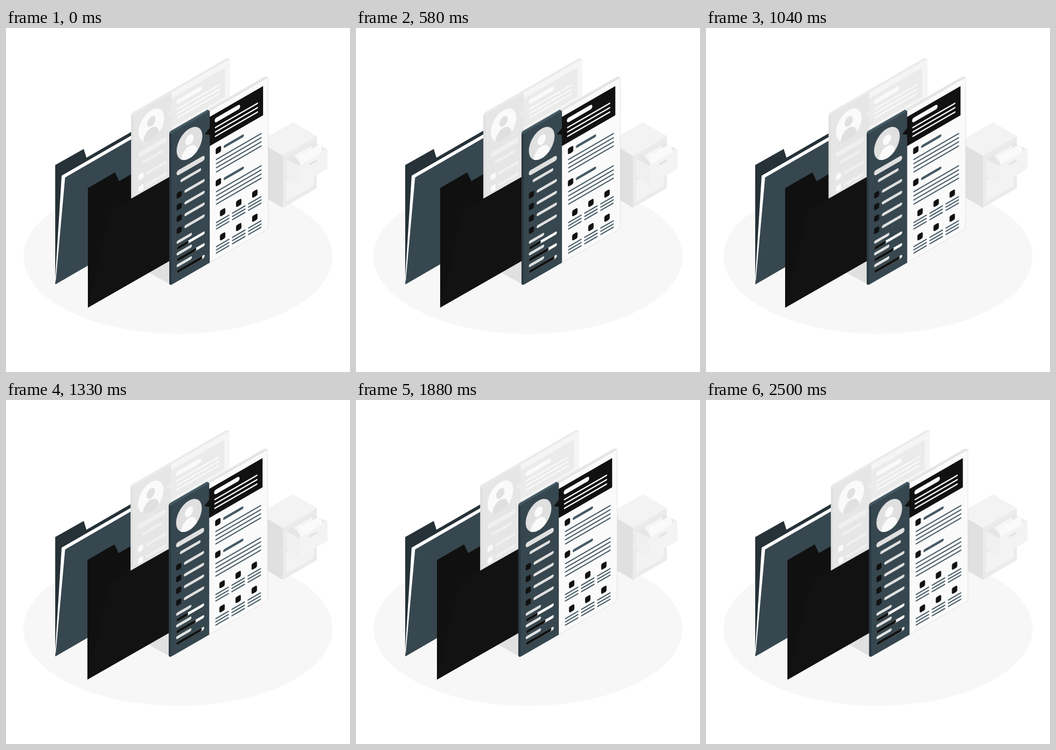
These frames come from a looping animation (748x748 px, 2.54 s). An HTML page:

```html
<!DOCTYPE html>
<html lang="en">
<head>
<meta charset="utf-8">
<title>Resume folders</title>
<style>
  html, body { margin: 0; width: 100%; height: 100%; overflow: hidden; background: #fff; }
  svg { display: block; width: 100vw; height: 100vh; }
  .dark {
    --top: #455a64; --side: #2c3a42; --panel: #37474f; --paper: #fafafa; --edge: #e6e6e6;
    --rim: #c4c4c4; --head: #111; --text: #fafafa; --disc: #e0e0e0; --person: #fafafa;
    --bar: #e0e0e0; --box: #111; --ink: #455a64; --level: #111; --rest: #fafafa;
  }
  .pale {
    --top: #ebebeb; --side: #e0e0e0; --panel: #e6e6e6; --paper: #f5f5f5; --edge: #ebebeb;
    --rim: #f5f5f5; --head: #ebebeb; --text: #fafafa; --disc: #fafafa; --person: #e0e0e0;
    --bar: #f0f0f0; --box: #fafafa; --ink: #e0e0e0; --level: #e0e0e0; --rest: #fafafa;
  }
</style>
</head>
<body>
<svg viewBox="0 0 748 748">
  <defs><clipPath id="disc"><circle cx="50.8" cy="276.4" r="32.3"/></clipPath></defs>

  <ellipse cx="374" cy="497" rx="336" ry="168" fill="#f7f7f7"/>

  <g id="cabinet">
    <path fill="#f3f3f3" d="M624 205L676 235L602 278L550 247Z"/>
    <path fill="#e0e0e0" d="M550 247L602 278V391L550 360Z"/>
    <path fill="#ebebeb" d="M602 278L676 235V348L602 391Z"/>
    <path fill="#f3f3f3" d="M609 333L669 299V343L609 377Z"/>
    <path fill="#e4e4e4" d="M609 285L669 250V292L609 327Z"/>
    <path fill="#f0f0f0" d="M609 285L638 300V341L609 324Z"/>
    <path fill="#e6e6e6" d="M609 285L669 250L699 264L638 300Z"/>
    <path fill="#f5f5f5" d="M626 277L666 254V266L638 292Z"/>
    <path fill="#fafafa" d="M636 276L646 273L683 252L687 262V272L640 298Z"/>
    <path fill="#f3f3f3" d="M638 299L687 271L690 262L699 265V306L638 341Z"/>
    <path stroke="#e2e2e2" stroke-width="4" stroke-linecap="round" d="M661 296L674 289"/>
  </g>

  <g id="folder">
    <path fill="#263238" d="M107 298L169 263L175 282L300 210V446L107 557Z"/>
    <path fill="#fff" d="M121 321L300 218V300L108 557L107 545Z"/>
    <path fill="#37474f" d="M128.500 325L300 226V446L107.500 557.500Z"/>
  </g>

  <g id="shaky">
    <path fill="#e0e0e0" d="M300 526L360 559V480H300Z"/>
    <path fill="#101010" d="M178 348L237 314L246 333L400 244V481L178 608Z"/>
    <g class="pale" transform="translate(-83 -40)"></g>
    <path fill="#121212" d="M228 396L400 298.500V481L178 608Z"/>
    <g class="dark"></g>
  </g>
</svg>
<script>
const fill = name => `style="fill:var(--${name})"`;
const shape = (name, d) => `<path ${fill(name)} d="${d}"/>`;
const box = (x, y, s = 13.5) =>
  `<rect x="${x - s / 2}" y="${y - s / 2}" width="${s}" height="${s}" rx="3.500" ${fill('box')}/>`;
const bar = (name, x1, x2, y, h) =>
  `<rect x="${x1}" y="${y - h / 2}" width="${x2 - x1}" height="${h}" rx="${h / 2}" ${fill(name)}/>`;
const circle = (name, cy, r, extra = '') =>
  `<circle cx="50.8" cy="${cy}" r="${r}" ${fill(name)} ${extra}/>`;
const each = (list, make) => list.map(make).join('');

function resume() {
  const slab =
    shape('edge', 'M95 225.500H238Q242 225.500 248.300 231.400V250H95Z') +
    `<path style="fill:var(--paper);stroke:var(--rim)" stroke-width=".5"
      d="M101.600 231.400H244Q248.300 231.400 248.300 236V556Q248.300 561 244 561H101.600Z"/>` +
    shape('top', 'M0 230Q0 225.500 4 225.500H95.800L101.600 231.400V561H8Q0 561 0 554Z') +
    shape('side', 'M0 229L5.800 234V561Q0 559 0 554Z') +
    shape('panel', 'M5.800 235Q5.800 231.400 9 231.400H101.600V561H5.800Z');

  const profile =
    circle('disc', 276.4, 32.3) + circle('person', 268.4, 10.4) +
    circle('person', 302, 19.8, 'clip-path="url(#disc)"') +
    bar('bar', 18.5, 89, 326, 11) + bar('bar', 28, 80, 347, 6.5);

  const contacts = each([375, 400.5, 426, 452], y =>
    box(25, y, 12.8) + bar('bar', 38, 89, y, 6.5));

  const skills = each([48.5, 68, 83], (end, i) => {
    const y = 476 + i * 25.5;
    return bar('bar', 18.5, 57, y, 6.5) +
      bar('rest', 19, 89, y + 13, 6.5) + bar('level', 19, end, y + 13, 6.5);
  });

  const header =
    shape('head', 'M101.600 244H235.600V307.500H101.600V283L89 275.500L101.600 268Z') +
    bar('text', 114, 178, 259, 10) +
    each([274.5, 284, 293.5], y => bar('text', 114.5, 223, y, 3.2));

  const sections = each([327, 397], y =>
    box(123.3, y) + bar('ink', 136.5, 187.5, y, 6) +
    each([18, 27, 36, 45], d => bar('ink', 117, 232, y + d, 2.8)));

  const grid = each([467.5, 520], y => each([134, 174.4, 214.8], x =>
    box(x, y) + each([14.5, 21.5, 28.5], d => bar('ink', x - 17, x + 17, y + d, 2.8))));

  return `<g transform="matrix(.866 -.5 0 1 355 0)">
    ${slab + profile + contacts + skills + header + sections + grid}</g>`;
}
document.querySelectorAll('.pale, .dark').forEach(g => { g.innerHTML = resume(); });

// Shake: [ms, x offset], straight lines between, shown at 24 pictures a second
const LOOP = 2540;
const shake = [
  [0, 0], [145, -1.5], [295, 3], [445, -6], [595, 6], [768, -6], [895, 6], [1045, -6],
  [1195, 3], [1340, -1.5], [1495, 0], [1645, -1.5], [1795, 3], [1945, -6],
  [2095, 6], [2245, -6], [2418, 6], [2568, -6]
];
function offsetAt(t) {
  const i = shake.findIndex(([ms]) => ms > t);
  const [t0, x0] = shake[i - 1], [t1, x1] = shake[i];
  return x0 + (x1 - x0) * (t - t0) / (t1 - t0);
}
const frames = Array.from({ length: 61 }, (_, k) => {
  const t = Math.round(k * 100 / 24) * 10;
  return { offset: t / LOOP, transform: `translateX(${offsetAt(t).toFixed(2)}px)`, easing: 'step-end' };
});
frames.push({ ...frames[60], offset: 1 });
document.getElementById('shaky').animate(frames, { duration: LOOP, iterations: Infinity });
</script>
</body>
</html>
```
